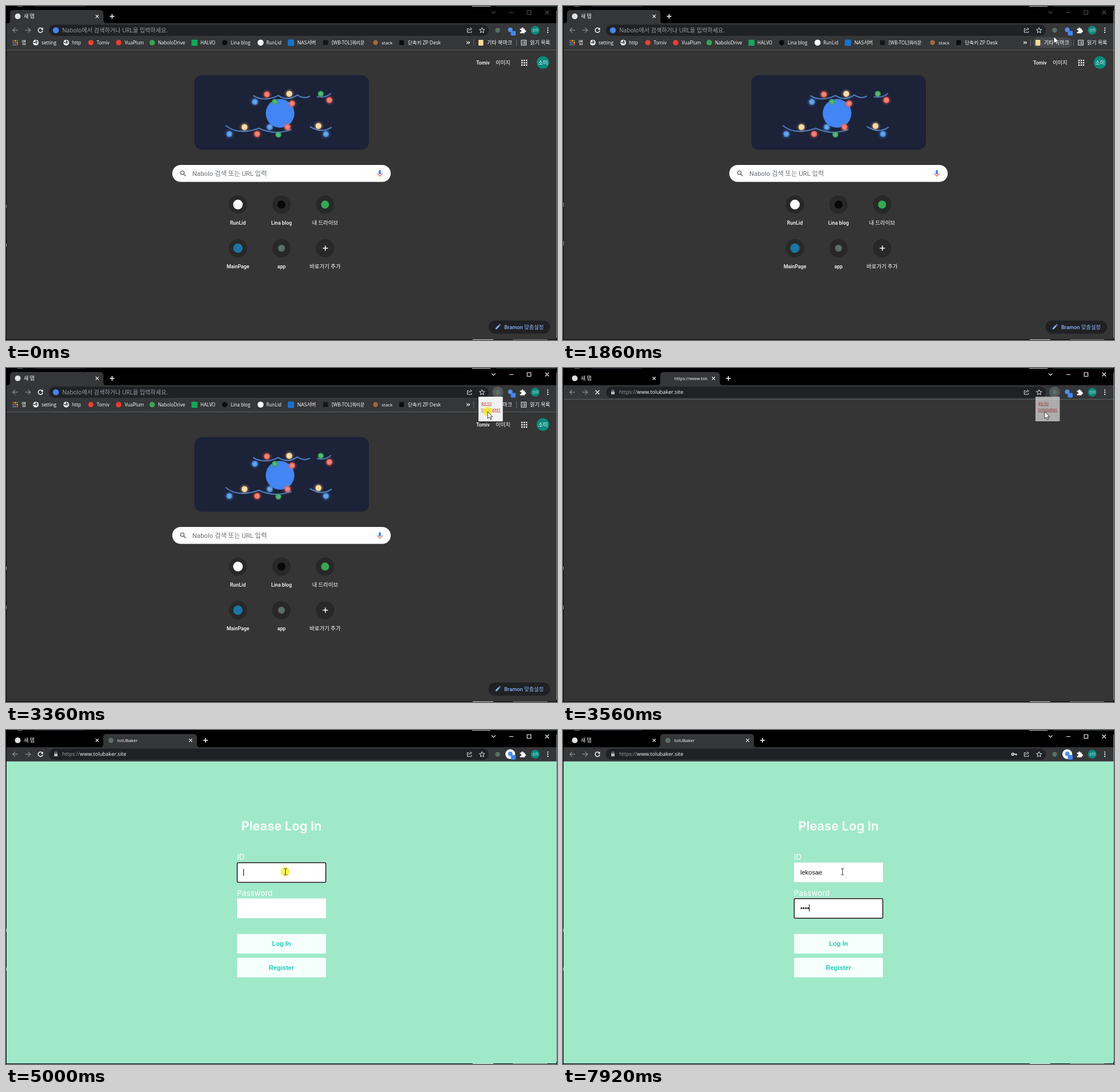
Recreate the animation shown at these times as an HTML page. Size 961x582 px, loop 8000 ms.

```html
<!DOCTYPE html>
<html lang="ko">
<head>
<meta charset="utf-8">
<title>Browser login</title>
<style>
html, body { margin: 0; width: 100%; height: 100%; overflow: hidden; background: #05050c; }
svg { display: block; width: 100vw; height: 100vh; }
text { white-space: pre; }
.ui, .label { font-family: "Open Sans", "Noto Sans CJK KR", "Noto Sans CJK", sans-serif; }
.web { font-family: Roboto, "Noto Sans CJK KR", "Noto Sans CJK", sans-serif; }
.label, .strong { font-weight: 500; }
.form { font-family: Inter, sans-serif; }
.arial { font-family: "Liberation Sans", Arial, sans-serif; }
</style>
</head>
<body>
<svg id="stage" viewBox="0 0 961 582" xmlns="http://www.w3.org/2000/svg"></svg>
<script>
const LOOP = 8000;
const BAR = '#353638', PAGE = '#353535', MINT = '#9fe9c9', WHITE = '#fff', BLUE = '#4285f4', CROC = '#5b6f67';

// Markup helpers
const text = (x, y, size, str, fill = WHITE, font = 'ui', extra = '') =>
  `<text x="${x}" y="${y}" font-size="${size}" fill="${fill}" class="${font}" ${extra}>${str}</text>`;
const rect = (x, y, w, h, fill, rx = 0, extra = '') =>
  `<rect x="${x}" y="${y}" width="${w}" height="${h}" rx="${rx}" fill="${fill}" ${extra}/>`;
const dot = (x, y, r, fill, extra = '') => `<circle cx="${x}" cy="${y}" r="${r}" fill="${fill}" ${extra}/>`;
const line = (d, color = WHITE, w = 1.2, extra = '') =>
  `<path d="${d}" fill="none" stroke="${color}" stroke-width="${w}" ${extra}/>`;
const shape = (d, fill, extra = '') => `<path d="${d}" fill="${fill}" ${extra}/>`;
const group = (id, body, extra = '') => `<g id="${id}" ${extra}>${body}</g>`;
const cross = (x, y, r, color = WHITE, w = 1.2) =>
  line(`M${x - r} ${y - r}l${2 * r} ${2 * r}m0 ${-2 * r}l${-2 * r} ${2 * r}`, color, w);
const plus = (x, y, r) => line(`M${x - r} ${y}h${2 * r}M${x} ${y - r}v${2 * r}`, WHITE, 1.5);
const MIDDLE = 'text-anchor="middle"';

function grid(x, y, step, size, colors) {
  let s = '';
  for (let i = 0; i < 9; i++)
    s += rect(x + i % 3 * step, y + Math.floor(i / 3) * step, size, size, colors[i % colors.length]);
  return s;
}

const globe = (x, y) => dot(x, y, 5, '#f1f3f4') +
  line(`M${x - 4.5} ${y - 1}l3 1.5l2-1l1.5 2.5M${x + 1} ${y - 4.5}l-1 2.5l3.5 1`, '#35363a', 1.3);

const avatar = (x, y, r, size) => dot(x, y, r, '#0a897c') +
  text(x, y + size * .37, size, '소미', WHITE, 'web strong', MIDDLE);

const tabPath = (a, b) =>
  `M${a - 5} 30Q${a} 30 ${a} 25V13Q${a} 7 ${a + 6} 7H${b - 6}Q${b} 7 ${b} 13V25Q${b} 30 ${b + 5} 30Z`;

function desktop() {
  return rect(0, 0, 961, 582, '#05050c') +
    rect(813, 0, 32, 1, '#ccc') + rect(20, 0, 9, 1, '#778') + rect(50, 0, 88, 1, '#2b2b3a') +
    rect(855, 0, 105, 1, '#2c4034') + rect(814, 581, 36, 1, '#ccc') + rect(884, 581, 60, 1, '#777') +
    rect(960, 8, 1, 570, '#8c8e8e') +
    group('marksA', rect(0, 346, 1, 6, '#887') + rect(0, 414, 1, 6, '#887')) +
    group('marksB', rect(0, 342, 1, 8, '#c63') + rect(0, 410, 1, 8, '#c83'));
}

function frame() {
  return rect(1, 1, 959, 29, '#000') + rect(1, 30, 959, 25, BAR) +
    shape(tabPath(7, 170), BAR, 'id="homeTab"') +
    dot(20.5, 18, 5, '#dfe1e5') + text(31, 21.2, 9, '새 탭', WHITE, 'label') + cross(159, 18, 2.6) +
    group('siteTab',
      shape('', BAR, 'id="siteShape"') +
      `<clipPath id="titleClip"><rect id="titleBox" x="190" y="8" width="1" height="20"/></clipPath>` +
      `<g clip-path="url(#titleClip)">${text(194, 21, 7.75, '', WHITE, 'ui', 'id="title"')}</g>` +
      dot(183, 18, 4.5, CROC, 'id="favicon"') +
      group('siteClose', cross(0, 18, 2.6))) +
    group('addTab', plus(0, 18, 4)) +
    group('controls', line('M847 9.5l3.3 3.3l3.3-3.3M878 11.5h7M909 8h6.5v6.5h-6.5zM940.5 8l6.5 6.5m0-6.5l-6.5 6.5', 'currentColor', 1.1));
}

function toolbar() {
  return line('M21 42.2h-9M16 38l-4.2 4.2l4.2 4.2M33.5 42.2h9M38.5 38l4.2 4.2l-4.2 4.2', '#8c8d90', 1.2) +
    group('reload', line('M63.2 39.6a4 4 0 1 0 .9 3.3', WHITE, 1.4) + shape('M64.6 37.6v3.9h-3.9z', WHITE)) +
    group('stop', cross(60, 42.2, 3.5, WHITE, 1.4)) +
    rect(75, 32.5, 767, 19.5, '#202124', 9.75) +
    rect(74.7, 32.7, 767.3, 19.2, 'none', 9.6, 'id="ring" stroke="#8ab4f8" stroke-width="1.3"') +
    group('homeUrl', dot(87, 42.2, 5.3, BLUE) + text(98, 45.6, 10.1, 'Nabolo에서 검색하거나 URL을 입력하세요.', '#9aa0a6')) +
    group('siteUrl', rect(84, 41, 6, 5, '#b5b8bc', .8) + line('M85.3 41v-1.2a1.7 1.7 0 0 1 3.4 0v1.2', '#b5b8bc', 1) +
      text(98, 45.4, 9.05, '<tspan fill="#9aa0a6">https://</tspan>www.tolubaker.site')) +
    group('key', dot(784.5, 42.2, 1.9, 'none', 'stroke="#dadce0" stroke-width="1.7"') + line('M786.5 42.2h5.2M790.5 42v2.5', '#dadce0', 1.7)) +
    line('M807 39.5h-2.5v6.5h7.5v-2.2M806.5 43.5q.5-3.5 4-3.5M809.6 37.7l2.8 2.3l-2.8 2.4', '#dadce0', 1) +
    line('M830.3 37.7l1.3 3.1l3.4.3l-2.6 2.2l.8 3.3l-2.9-1.8l-2.9 1.8l.8-3.3l-2.6-2.2l3.4-.3z', '#e8eaed', 1) +
    dot(857.5, 42, 9.6, '#56585b', 'id="extHover"') + dot(857.5, 42.2, 4.2, CROC) +
    dot(879.5, 42, 8.6, WHITE, 'id="badgeBack"') + dot(879.5, 41.5, 4, '#4f93e6') + rect(880.5, 43.5, 8.5, 8, BLUE, 1.5) +
    shape('M896.5 39.5h2.6a1.7 1.7 0 1 1 3.3 0h2.3v2.7a1.7 1.7 0 1 1 0 3.2v2.1h-8.2v-2.4a1.7 1.7 0 1 0 0-3.1z', WHITE) +
    avatar(923, 42.2, 7.6, 5.8) +
    dot(945, 38.5, 1.1, WHITE) + dot(945, 42.2, 1.1, WHITE) + dot(945, 45.9, 1.1, WHITE);
}

function bookmarks() {
  const y = 63.8;
  const links = [
    [27, 8.8, '앱'], [62, 8.2, 'setting'], [115, 8.2, 'http'], [158, 8.1, 'Tomiv'], [207, 8.1, 'VuaPlum'],
    [265, 8.1, 'NaboloDrive'], [339, 8.1, 'HALVO'], [392, 8.1, 'Lina blog'], [454, 8.1, 'RunLid'],
    [508, 8.6, 'NAS서버'], [568, 8.1, '[WB-TOL]쿼리문'], [655, 8, 'stack'], [701, 8.5, '단축키 ZP Desk'],
    [839, 9, '기타 북마크'], [914, 8.9, '읽기 목록']
  ];
  return rect(1, 54.5, 959, 22, BAR) + rect(819, 54.5, 69, 18.5, '#46484b', 9.2, 'id="folderHover"') +
    grid(11.5, 59.3, 3.5, 2.4, ['#ea4335', '#fbbc05', '#34a853', '#4285f4']) +
    globe(52, y) + globe(105, y) +
    dot(148, y, 4.6, '#ea4335') + dot(196.5, y, 4.8, '#f03a30') + dot(255, y, 4.8, '#34a853') +
    rect(323.5, 58.8, 10.5, 10.5, '#16a75a') + dot(381.5, y, 4.6, '#0c0c0c') + dot(444, y, 5.3, WHITE) +
    rect(491.5, 58.5, 11, 11, '#1a73c9', 1) + rect(553, 59.5, 8.5, 8.5, '#161616') +
    dot(644.5, y, 4.2, '#a5673a') + rect(686, 59.5, 8, 8.5, '#0c0c0c') +
    line('M803.3 61.6l2.2 2.2l-2.2 2.2M806.4 61.6l2.2 2.2l-2.2 2.2', WHITE, 1.1) +
    rect(815, 58, 1, 12, '#65676a') + rect(890, 58, 1, 12, '#65676a') +
    rect(824, 59, 8.5, 10, '#fbdc94', .8) +
    line('M898.7 59.5h8.8v8.8h-8.8zM900.2 62h1M902.4 62h3.6M900.2 64h1M902.4 64h3.6M900.2 66h1M902.4 66h3.6', WHITE, .9) +
    links.map(([x, size, s]) => text(x, 66.7, size, s, WHITE, 'label')).join('') +
    rect(1, 76, 959, 1, '#5b5c5e');
}

function lights() {
  const red = '#ee6a5c', cream = '#fdd49a', green = '#36a35d', blue = '#4a90e0';
  const bulbs = [
    [455, 154, red], [494, 153, cream], [549, 153, green], [564, 164, red], [434, 167, blue],
    [469, 167, green], [499, 170, red], [389.5, 223, blue], [416, 211, cream], [438, 223, red],
    [460, 211, blue], [475, 224, green], [491, 211, red], [545, 209, cream], [558, 223, blue]
  ];
  const glow = (x, y, c) => c === green ? '' : dot(x, y, 9, c, 'opacity=".1"') + dot(x, y, 7, c, 'opacity=".15"');
  return line('M431 156Q450 168 475 156Q491 167 508 155Q520 163 530 157M542 158Q557 161 567 152', '#4c78b8', 2.2) +
    line('M383 208Q404 226 441 213Q468 226 498 215M530 210Q551 223 568 211', '#4c78b8', 2.2) +
    bulbs.map(([x, y, c]) => glow(x, y, c) + dot(x, y, 5.2, c) + dot(x, y, 3, WHITE, 'opacity=".2"')).join('');
}

function homePage() {
  const tiles = [
    [404.5, 346, 'RunLid', dot(404.5, 346, 8.4, WHITE)],
    [480.5, 346, 'Lina blog', dot(480.5, 346, 7, '#080808')],
    [556.5, 346, '내 드라이브', dot(556.5, 346, 7, '#34a853')],
    [404.5, 422, 'MainPage', dot(404.5, 422, 8.2, '#1b75a5')],
    [480.5, 422, 'app', dot(480.5, 422, 6, CROC)],
    [556.5, 422, '바로가기 추가', plus(557, 422, 4.5)]
  ];
  return rect(1, 76, 959, 505, PAGE) + bookmarks() +
    text(820, 101.5, 8.8, 'Tomiv', WHITE, 'web strong') + text(854, 101.5, 9.3, '이미지', WHITE, 'web strong') +
    grid(898.7, 93.7, 4, 2.4, [WHITE]) + avatar(936.5, 98.5, 11, 9) +
    rect(328.5, 120.5, 304.5, 130, '#1c2238', 13) + dot(478, 187, 25, BLUE) + lights() +
    rect(290, 277, 381, 29.5, WHITE, 14.75) +
    dot(307.6, 290.5, 3.1, 'none', 'stroke="#5f6368" stroke-width="1.3"') + line('M310 293l3.6 3.6', '#5f6368', 1.4) +
    text(325, 295.8, 11.3, 'Nabolo 검색 또는 URL 입력', '#6b6f74', 'web') +
    rect(650.1, 286, 3.8, 7.5, BLUE, 1.9) + line('M648 291.3a4 4 0 0 0 8 0', '#ea4335', 1.2) + line('M652 295.3v3', '#f29900', 1.3) +
    tiles.map(([x, y, s, icon]) => dot(x, y, 16, '#282828') + icon +
      text(x, y + 35.4, /[a-z]/.test(s) ? 8.8 : 9.4, s, WHITE, 'web strong', MIDDLE)).join('') +
    rect(841.5, 548, 107.5, 23, '#202124', 11.5) +
    shape('M853.8 563.2v-2l5.4-5.4l2 2l-5.4 5.4zM859.9 555.1l1-1l2 2l-1 1z', '#8ab4f8') +
    text(869, 562.8, 9.25, 'Bramon 맞춤설정', '#8ab4f8', 'web strong');
}

function sitePage() {
  const button = (y, s) => rect(403, y, 155, 34, '#f5fffc', 1) +
    text(480.5, y + 20.6, 11, s, '#1ccab6', 'arial', MIDDLE + ' font-weight="700"');
  const focus = (id, y) => group(id, rect(402, y - 1, 157, 36.5, WHITE, 2.5) +
    rect(403.2, y + .2, 154.6, 34.2, WHITE, 2, 'stroke="#101010" stroke-width="1.5"'));
  const caret = (id, y) => rect(414, y, 1, 12, '#000', 0, `id="${id}"`);
  return rect(1, 55, 959, 526, PAGE, 0, 'id="siteBack"') + rect(1, 54, 959, 1, '#5f6062') +
    group('form',
      text(480.5, 175, 21.9, 'Please Log In', WHITE, 'form', MIDDLE + ' font-weight="600"') +
      text(403, 226, 13.2, 'ID', WHITE, 'form') + text(403, 288.5, 13.4, 'Password', WHITE, 'form') +
      rect(403, 231, 155, 34, WHITE, 1) + rect(403, 293.5, 155, 34.5, WHITE, 1) +
      focus('focusId', 231) + focus('focusPw', 293.5) +
      text(414, 251.6, 11, '', '#111', 'arial', 'id="idText"') + text(414, 314, 11, '', '#111', 'arial', 'id="pwText"') +
      caret('idCaret', 242) + caret('pwCaret', 304) +
      button(355.5, 'Log In') + button(397, 'Register'));
}

function popup() {
  return group('popup', rect(823.5, 1, 43.5, 43.5, '#000', 1, 'opacity=".25"') + rect(824, 0, 42.5, 43, '#f1f1f1', .5) +
    group('link', text(829, 14.3, 7.6, 'go to', 'currentColor', 'ui', 'text-decoration="underline"') +
      text(829, 25.3, 7.5, 'tolubaker', 'currentColor', 'ui', 'text-decoration="underline"')));
}

function pointer() {
  return group('pointer', dot(0, 0, 8.2, '#f5ef31', 'id="press" opacity=".8"') +
    shape('M0 0V12.2L2.9 9.6L4.9 14L6.8 13.2L4.9 9H8.7Z', WHITE, 'id="arrow" stroke="#111" stroke-width=".8"') +
    line('M-2 -5.5Q0 -5.5 .5 -4.5Q1 -5.5 3 -5.5M.5 -4.5V4.5M-2 5.5Q0 5.5 .5 4.5Q1 5.5 3 5.5', '#444', 1.1, 'id="beam"'));
}

const stage = document.getElementById('stage');
stage.innerHTML = desktop() + frame() + toolbar() + group('home', homePage()) + group('site', sitePage()) + popup() + pointer();
const el = {};
stage.querySelectorAll('[id]').forEach(n => el[n.id] = n);

// Timeline
const USER = 'lekosae';
const idKeys = [5860, 5930, 6130, 6330, 6530, 6730, 6990];
const pwKeys = [7450, 7720, 7820, 7920];
const inputs = [5000, ...idKeys, 7190, ...pwKeys];
const presses = [[2280, 2350], [3360, 3430], [5000, 5050]];
const path = [
  [670, 586, 488], [1440, 848, 95], [1510, 862, 92], [1580, 900, 84], [1720, 880, 64], [1860, 856, 53],
  [2070, 857, 46], [2140, 859, 47], [2590, 859, 47], [2900, 840, 76], [4130, 840, 76], [4450, 487, 247]
];

const clamp = v => Math.min(1, Math.max(0, v));
const ramp = (t, a, b) => clamp((t - a) / (b - a));
const within = (t, a, b) => t >= a && t < b;
const show = (node, on) => node.setAttribute('display', on ? 'inline' : 'none');
const count = (t, keys) => keys.filter(k => t >= k).length;

function pointerAt(t) {
  const i = count(t, path.map(p => p[0]));
  if (i >= path.length) return path[path.length - 1].slice(1);
  if (!i) return path[0].slice(1);
  const [t0, x0, y0] = path[i - 1], [t1, x1, y1] = path[i];
  const k = (t - t0) / (t1 - t0);
  return [x0 + (x1 - x0) * k, y0 + (y1 - y0) * k];
}

function drawTabs(t, onSite) {
  const loaded = t >= 3800;
  const k = ramp(t, 3470, 3699);
  const right = onSite ? 169 + Math.max(20, 164 * (1 - (1 - k) ** 2)) : 170;
  show(el.siteTab, onSite);
  show(el.homeTab, !onSite);
  show(el.favicon, loaded);
  show(el.siteClose, right > 215);
  el.siteShape.setAttribute('d', tabPath(169.5, right));
  el.titleBox.setAttribute('width', Math.max(0, right - 211));
  el.title.textContent = loaded ? 'tolUBaker' : 'https://www.tolubaker.site';
  el.siteClose.setAttribute('transform', `translate(${right - 11} 0)`);
  el.addTab.setAttribute('transform', `translate(${right + 15} 0)`);
}

function drawForm(t) {
  const last = inputs.filter(k => t >= k).pop();
  const lit = last !== undefined && (t - last) % 1000 < 505;
  const inPw = t >= 7190;
  show(el.form, t >= 3800);
  show(el.focusId, within(t, 5000, 7190));
  show(el.focusPw, inPw);
  el.idText.textContent = USER.slice(0, count(t, idKeys));
  el.pwText.textContent = '•'.repeat(count(t, pwKeys));
  show(el.idCaret, lit && !inPw);
  show(el.pwCaret, lit && inPw);
  const end = node => 414 + (node.textContent ? Math.round(node.getComputedTextLength()) : 0);
  el.idCaret.setAttribute('x', end(el.idText));
  el.pwCaret.setAttribute('x', end(el.pwText));
}

function drawPopup(t) {
  const open = within(t, 2400, 3667);
  show(el.popup, open);
  el.popup.setAttribute('opacity', ramp(t, 2400, 2520) * (1 - ramp(t, 3500, 3667)));
  el.popup.setAttribute('transform', `translate(0 ${56 - 6 * ramp(t, 2400, 2625)})`);
  el.link.setAttribute('color', t >= 3360 ? '#c5281c' : '#551a8b');
}

function drawPointer(t) {
  const [x, y] = pointerAt(t);
  const typing = t > 4130 && x > 403 && x < 558 && y > 231 && y < 265;
  show(el.pointer, t >= 670);
  show(el.beam, typing);
  show(el.arrow, !typing);
  show(el.press, presses.some(([a, b]) => within(t, a, b)));
  el.pointer.setAttribute('transform', `translate(${x} ${y})`);
}

function draw(t) {
  const onSite = t >= 3460;
  const early = within(t, 70, 260);
  const loading = within(t, 3460, 4060);
  show(el.home, !onSite);
  show(el.site, onSite);
  show(el.homeUrl, !onSite);
  show(el.siteUrl, onSite);
  show(el.stop, loading);
  show(el.reload, !loading);
  show(el.ring, early);
  show(el.key, t >= 7450);
  show(el.extHover, within(t, 2000, 3700));
  show(el.badgeBack, t >= 3600);
  show(el.folderHover, within(t, 1690, 1960));
  show(el.marksA, !within(t, 260, 2280));
  show(el.marksB, within(t, 260, 2280));
  el.controls.setAttribute('color', early || t >= 2280 ? WHITE : '#555');
  el.siteBack.setAttribute('fill', t >= 3600 ? MINT : PAGE);
  drawTabs(t, onSite);
  drawForm(t);
  drawPopup(t);
  drawPointer(t);
}

const start = performance.now();
function tick() {
  draw((performance.now() - start) % LOOP);
  requestAnimationFrame(tick);
}
tick();
</script>
</body>
</html>
```
